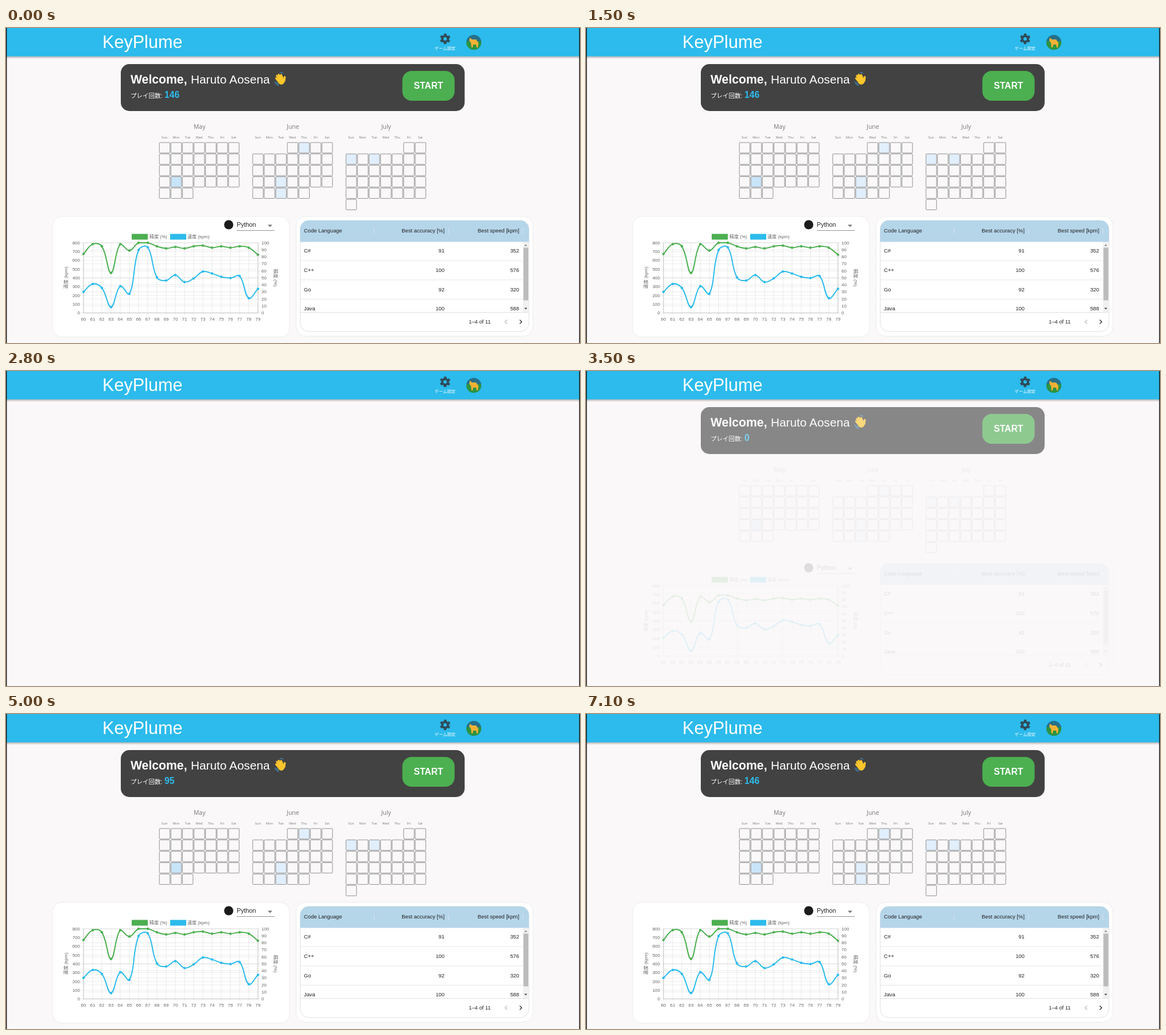
An HTML page for the animation above (7.2 s loop, 1000 by 550 pixels).

```html
<!DOCTYPE html>
<html lang="ja">
<head>
<meta charset="utf-8">
<title>Typing dashboard</title>
<style>
  html, body { margin: 0; width: 100%; height: 100%; overflow: hidden; background: #faf8f9; }
  svg { display: block; width: 100vw; height: 100vh; }
  text { font-family: "Liberation Sans", "Noto Sans CJK JP", "Noto Sans CJK", sans-serif; }
  .calendar text { font-family: "Open Sans", "Noto Sans", sans-serif; fill: #777; }
  .chart text { font-size: 8px; fill: #666; }
  .table text { font-size: 9.35px; fill: #222; }
  .end { text-anchor: end; }
  .mid { text-anchor: middle; }
  .bold { font-weight: bold; }
</style>
</head>
<body>
<svg viewBox="0 0 1000 550">
  <defs>
    <linearGradient id="shade" x2="0" y2="1">
      <stop stop-color="#000" stop-opacity=".3"/>
      <stop offset="1" stop-color="#000" stop-opacity="0"/>
    </linearGradient>
    <clipPath id="disc"><circle cx="815" cy="25" r="13"/></clipPath>
  </defs>
  <rect width="1000" height="550" fill="#faf8f9"/>

  <g id="header">
    <rect y="49" width="1000" height="5" fill="url(#shade)"/>
    <rect width="1000" height="49.5" fill="#2cbbec"/>
    <text x="168" y="34.5" font-size="30.6" fill="#fff">KeyPlume</text>
    <g fill="none" stroke="#2f4b58">
      <circle cx="765" cy="19" r="5" stroke-width="4"/>
      <circle cx="765" cy="19" r="7.7" stroke-width="3" stroke-dasharray="4.3 3.76" stroke-dashoffset="2.1" transform="rotate(30 765 19)"/>
    </g>
    <text x="765" y="38" font-size="7.3" fill="#fff" class="mid">ゲーム設定</text>
    <g clip-path="url(#disc)">
      <rect x="802" y="12" width="26" height="26" fill="#25708a"/>
      <rect x="802" y="23" width="26" height="15" fill="#2c9440"/>
      <path d="M808 17l4 3 7 0 4 6-1 8h-2l-1-5h-5l-1 5h-2l-1-8-3-4z" fill="#f2b136"/>
    </g>
  </g>

  <g id="welcome">
    <rect x="200" y="63" width="599" height="82" rx="15" fill="#424242"/>
    <text x="217" y="96.5" font-size="21.2" fill="#fff" class="bold">Welcome,</text>
    <text x="322" y="96.5" font-size="20.8" fill="#fff">Haruto Aosena</text>
    <g transform="translate(477.5 89.5) rotate(-32)" fill="none" stroke="#fcc62c" stroke-width="3.4" stroke-linecap="round">
      <ellipse cx="0" cy="3.5" rx="6" ry="6.3" fill="#fcc62c" stroke="none"/>
      <path d="M-4 2L-5-5M-1 1L-1.6-8M2 1L2-8M4.5 2L5.4-5.5M5 6L9 1"/>
      <path d="M-10-1Q-11 4-8 8M-8 1Q-8.5 4-7 6M6-10Q9-9 10-6" stroke="#3e8fc4" stroke-width="1.1"/>
    </g>
    <text x="217" y="121.5" font-size="10.5" fill="#fff">プレイ回数:</text>
    <text id="count" x="276" y="122" font-size="15.7" fill="#2cbbec" class="bold"></text>
    <rect x="690.5" y="75" width="91" height="52" rx="16" fill="#4caf50"/>
    <text x="736" y="106.3" font-size="15.7" fill="#fff" class="bold mid">START</text>
  </g>

  <g id="content">
    <g id="calendars" class="calendar"></g>
    <g fill="#fff" stroke="#ececec">
      <rect x="81" y="329" width="413" height="210.5" rx="16"/>
      <rect x="505.5" y="329" width="412.5" height="209" rx="16"/>
    </g>

    <circle cx="388" cy="343.5" r="8" fill="#1c1c1c"/>
    <text x="402" y="347" font-size="10.8" fill="#222">Python</text>
    <path d="M402 353.5H468" stroke="#949494"/>
    <path d="M456 343.5h8l-4 4z" fill="#757575"/>

    <g class="chart">
      <rect x="219" y="359.5" width="28" height="10" fill="#4caf50"/>
      <text x="250" y="367">精度 (%)</text>
      <rect x="286" y="359.5" width="28" height="10" fill="#2cbbec"/>
      <text x="316" y="367">速度 (kpm)</text>
      <text class="mid" transform="translate(107 436) rotate(-90)">速度 (kpm)</text>
      <text class="mid" transform="translate(467 436) rotate(90)">精度 (%)</text>
      <g id="axes"></g>
      <g id="lines"></g>
    </g>

    <g class="table">
      <rect x="512.5" y="336" width="398.5" height="194" rx="15" fill="#fff" stroke="#e0e0e0"/>
      <path d="M512.5 373.5V351a15 15 0 0 1 15-15H896a15 15 0 0 1 15 15V373.5z" fill="#b5d5e9"/>
      <path d="M641.5 349V360M771 349V360M900.5 349V360" stroke="#d5e2ea"/>
      <text x="519" y="357.3">Code Language</text>
      <text x="764" y="357.3" class="end">Best accuracy [%]</text>
      <text x="894" y="357.3" class="end">Best speed [kpm]</text>
      <g id="rows"></g>
      <path d="M513 496.5H911" stroke="#e0e0e0"/>
      <rect x="900.5" y="374" width="10" height="122" fill="#f1f1f1"/>
      <rect x="901.5" y="383.5" width="8.5" height="92" fill="#bcbcbc"/>
      <path d="M903 380.5h5l-2.5-3z" fill="#8a8a8a"/>
      <path d="M903 488.5h5l-2.5 3z" fill="#444"/>
      <text x="844.5" y="516" class="end">1–4 of 11</text>
      <g fill="none" stroke-width="1.4">
        <path d="M873 509.5l-3.5 3.5 3.5 3.5" stroke="#bdbdbd"/>
        <path d="M895 509.5l3.5 3.5-3.5 3.5" stroke="#333"/>
      </g>
    </g>
  </g>

  <path d="M.7 0V550M999.3 0V550" stroke="#151515" stroke-width="1.4"/>
</svg>

<script>
const LOOP = 7200, BLANK = 1900, HEADER = 2500;
const CHART = { left: 135, right: 439, top: 375, bottom: 497.5 };
const SERIES = [
  { color: '#2cbbec', max: 800, values: [240, 330, 285, 67, 304, 218, 718, 748, 405, 370, 431, 352, 394, 472, 450, 412, 398, 421, 168, 275] },
  { color: '#4caf50', max: 100, values: [84, 98, 95, 57, 98, 89, 100, 100, 95, 92, 94, 92, 95, 96, 93, 95, 93, 95, 93, 83] },
];
const $ = id => document.getElementById(id);
const clamp = (v, lo = 0, hi = 1) => Math.min(hi, Math.max(lo, v));
const label = (x, y, content, attrs = '') => `<text x="${x}" y="${y}" ${attrs}>${content}</text>`;
const times = (n, fn) => Array.from({ length: n }, (_, i) => fn(i)).join('');

function calendar({ name, x, first, days, active }) {
  const head = label(x + 70, 176.3, name, 'font-size="10.4" class="mid"') +
    ['Sun', 'Mon', 'Tue', 'Wed', 'Thu', 'Fri', 'Sat'].map((day, i) =>
      label(x + 9 + i * 20.1, 193, day, 'font-size="5.8" class="mid"')).join('');
  return head + times(days, i => {
    const slot = i + first;
    return `<rect x="${x + slot % 7 * 20.1}" y="${200 + Math.floor(slot / 7) * 19.85}" width="18.4" height="18.2"
      rx="1" fill="${active[i + 1] || '#faf8f9'}" stroke="#929292"/>`;
  });
}

const pale = '#e1eefb', strong = '#c8e4f8';
$('calendars').innerHTML = [
  { name: 'May', x: 267.2, first: 0, days: 31, active: { 23: strong } },
  { name: 'June', x: 429.8, first: 3, days: 30, active: { 2: pale, 21: pale, 28: pale } },
  { name: 'July', x: 592.3, first: 5, days: 31, active: { 3: pale, 5: pale } },
].map(calendar).join('');

$('rows').innerHTML = [['C#', 91, 352], ['C++', 100, 576], ['Go', 92, 320], ['Java', 100, 588]]
  .map(([language, accuracy, speed], i) => {
    const y = 392 + i * 33.8;
    return label(519, y, language) + label(764, y, accuracy, 'class="end"') + label(894, y, speed, 'class="end"') +
      (i < 3 ? `<path d="M513 ${y + 14}H900" stroke="#e6e6e6"/>` : '');
  }).join('');

const pointX = i => CHART.left + i * (CHART.right - CHART.left) / 19;
const level = ratio => CHART.bottom - ratio * (CHART.bottom - CHART.top);
const gridLine = d => `<path d="${d}" stroke="#000" stroke-opacity=".1" stroke-width=".8"/>`;
$('axes').innerHTML =
  times(20, i => gridLine(`M${pointX(i)} ${CHART.top}V501`) + label(pointX(i), 511, 60 + i, 'class="mid"')) +
  times(9, i => gridLine(`M131 ${level(i / 8)}H${CHART.right}`) + label(129, level(i / 8) + 2.7, i * 100, 'class="end"')) +
  times(11, i => gridLine(`M${CHART.left} ${level(i / 10)}H443`) + label(445, level(i / 10) + 2.7, i * 10)) +
  `<path d="M135 375V497.5H439V375" fill="none" stroke="#bbb" stroke-width=".8"/>`;

function spline(points) {
  const handles = points.map((p, i) => {
    const prev = points[i - 1] || p, next = points[i + 1] || p;
    const before = Math.hypot(p[0] - prev[0], p[1] - prev[1]);
    const after = Math.hypot(next[0] - p[0], next[1] - p[1]);
    const handle = length => {
      const k = 0.4 * length / (before + after);
      return [p[0] + k * (next[0] - prev[0]), clamp(p[1] + k * (next[1] - prev[1]), CHART.top, CHART.bottom)];
    };
    return { into: handle(-before), out: handle(after) };
  });
  return 'M' + points[0] + points.slice(1).map((p, i) =>
    `C${handles[i].out} ${handles[i + 1].into} ${p}`).join('');
}

function drawLines(growth) {
  $('lines').innerHTML = SERIES.map(({ color, max, values }) => {
    const points = values.map((v, i) => [pointX(i), level(v / max * growth)]);
    return `<path d="${spline(points)}" fill="none" stroke="${color}" stroke-width="2"/>` +
      points.map(([x, y]) => `<circle cx="${x}" cy="${y}" r="1.9" fill="${color}" stroke="${color}" stroke-width=".6"/>`).join('');
  }).join('');
}

const smooth = u => u * u * (3 - 2 * u);
const fade = (t, start) => smooth(clamp((t - start) / 570));

function render(t) {
  const before = t < BLANK;
  $('header').style.opacity = before || t >= HEADER ? 1 : 0;
  $('welcome').style.opacity = before ? 1 : fade(t, 3170);
  $('content').style.opacity = before ? 1 : fade(t, 3380);
  $('count').textContent = before ? 146 : Math.floor(146 * clamp((t - 3692) / 2000));
  drawLines(before ? 1 : 1 - (1 - clamp((t - 3110) / 1000)) ** 4);
}

// The picture advances in 100 ms steps.
let shown = -1;
function tick(now) {
  const step = Math.floor(now % LOOP / 100);
  if (step !== shown) render((shown = step) * 100);
  requestAnimationFrame(tick);
}
render(0);
requestAnimationFrame(tick);
</script>
</body>
</html>
```
